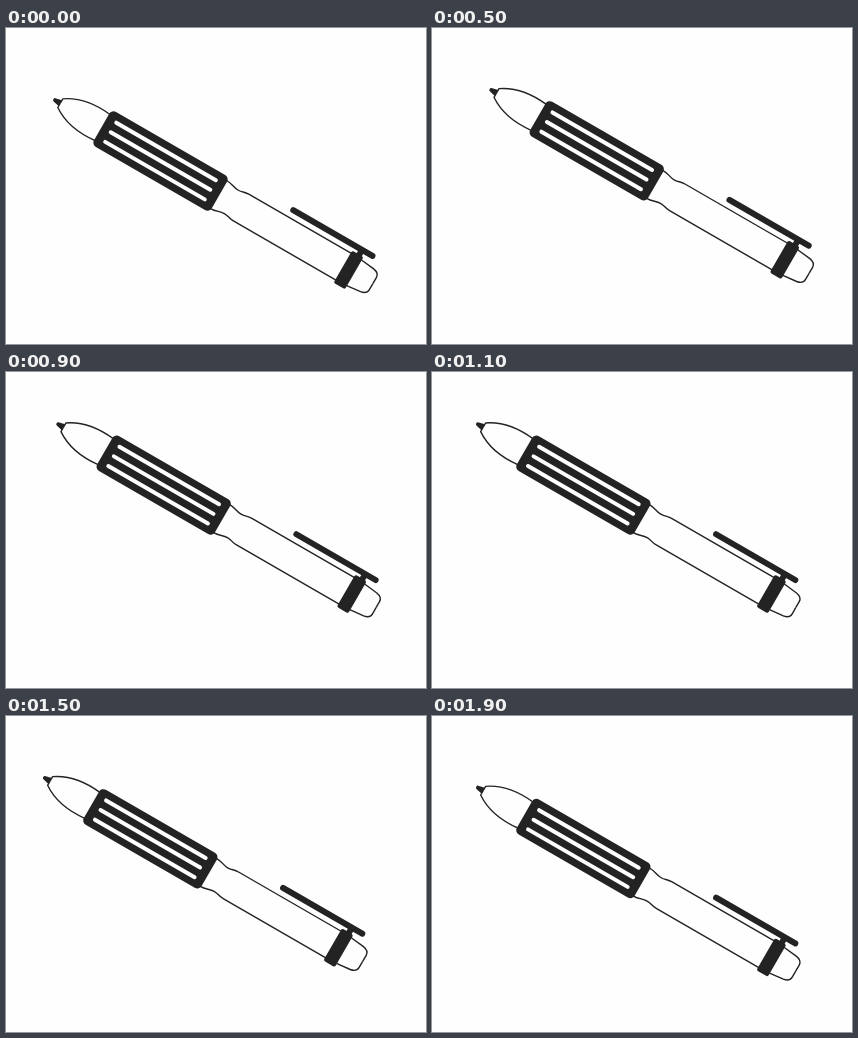
An HTML page without scripts that plays this animation: 420x316 px, repeating every 2000 ms.

```html
<!DOCTYPE html>
<html lang="en">
<head>
<meta charset="utf-8">
<title>Floating pen</title>
<style>
  @property --turn { syntax: "<angle>"; inherits: false; initial-value: 0deg; }
  html, body { margin: 0; width: 100%; height: 100%; overflow: hidden; background: #fefefe; }
  svg { display: block; width: 100vw; height: 100vh; }
  /* small circular drift, twenty poses per loop */
  .drift {
    --r: 10.2px;
    transform: translate(calc(sin(var(--turn)) * var(--r)), calc((cos(var(--turn)) - 1) * var(--r)));
    animation: drift 2s steps(20) infinite;
  }
  @keyframes drift { to { --turn: 360deg; } }
  .ink { fill: #232323; }
  .line { fill: none; stroke: #232323; stroke-width: 1.4; stroke-linejoin: round; }
  .bar { stroke: #232323; stroke-width: 6; stroke-linecap: round; }
  .slit { stroke: #fefefe; stroke-width: 4; stroke-linecap: round; }
</style>
</head>
<body>
<svg viewBox="0 0 420 316">
  <defs>
    <path id="side" d="M5.8 0V-5C16 -12 32 -17.5 55 -15
      M188 -16.2C196 -16.2 197 -13.6 203 -13.6S208 -15.4 215 -15.4H336
      M345 -14.8L360 -13.2Q366.6 -12.2 366.7 -7V0"/>
  </defs>
  <g class="drift">
    <!-- pen axis runs along x, nib at the origin -->
    <g transform="translate(49.4 72.1) rotate(30) translate(0 .2)">
      <use href="#side" class="line"/>
      <use href="#side" class="line" transform="scale(1 -1)"/>
      <path class="ink" d="M-.2 -2L5.8 -3.4V3.4L-.2 2A2 2 0 0 1 -.2 -2Z"/>
      <rect class="ink" x="53.5" y="-20.2" width="136" height="40.4" rx="5"/>
      <path class="slit" d="M64 -11.1H179M64 0H179M64 11.1H179"/>
      <rect class="ink" x="332.2" y="-18.3" width="13.2" height="37.2" rx="2"/>
      <path class="bar" d="M261 -23.8H352.5M340.5 -23V-17"/>
    </g>
  </g>
</svg>
</body>
</html>
```
